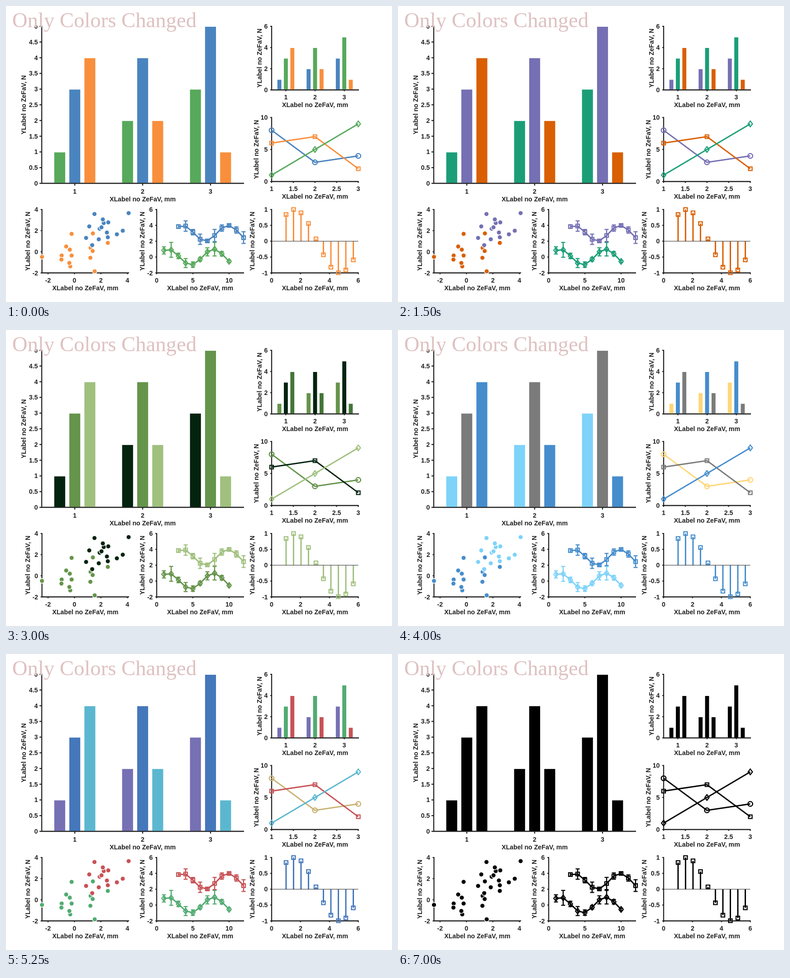
Write an HTML page with a canvas that moves like this. It is 853 px wide and 656 px high and loops after 7.38 s.

```html
<!DOCTYPE html>
<html lang="en">
<head>
<meta charset="utf-8">
<title>Only Colors Changed</title>
<style>
html, body { margin: 0; width: 100%; height: 100%; overflow: hidden; background: #fff; }
canvas { display: block; width: 853px; height: 656px; }
</style>
</head>
<body>
<canvas id="stage" width="853" height="656"></canvas>
<script>
const ctx = document.getElementById("stage").getContext("2d");
const LOOP = 7380;
const INK = "#212121";
const TAU = Math.PI * 2;
const NAME = "ZeFaV";
const COMMON = "10201202102012";

// Each scheme: start time, colours, and one colour index per series
// (wide bars, narrow bars, lines, scatter, error bars, stems).
const schemes = [
  [0, "#4a84bf #57a95b #f98f3c", COMMON],
  [250, "#0072bd #d95319 #edb120", COMMON],
  [1000, "#4270ae #b85d27 #eee364", "10212021002012"],
  [1500, "#7570b3 #1b9e77 #d95f02", COMMON],
  [2000, "#0000b3 #a2a2a6 #000000 #92c0f8", "10230132113103"],
  [2500, "#4292c6 #08306b #9ecae1", COMMON],
  [3000, "#03230f #65944b #a0c07e #437638", "01210310201212"],
  [3500, "#e6732e #7f2704 #fdae6b", COMMON],
  [4000, "#7dd3f9 #7b7b7b #468dcd #ffd678", "01232131202202"],
  [4500, "#4c72b0 #55a868 #c44e52", COMMON],
  [5250, "#7670b4 #4577bb #5bb7cf #52ab72 #c75256 #c9b274", "01203454243431"],
  [5750, "#4878cf #6acc65 #d65f5f", COMMON],
  [6250, "#0072b2 #009e73 #d55e00", COMMON],
  [6750, "#777777 #333333 #aaaaaa", COMMON],
  [7000, "#000000", "00000000000000"]
].map(([start, list, slots]) => {
  const colors = list.split(" ");
  return { start, colors: [...slots].map(i => colors[i]) };
});

// Plot boxes: pixel edges, data limits, ticks and label positions.
const wide = { l: 79, r: 525, t: 45, b: 393, x: [0.513, 3.487], y: [0, 5], xt: [1, 2, 3],
  yt: [0, 0.5, 1, 1.5, 2, 2.5, 3, 3.5, 4, 4.5, 5], yl: 39, gap: 18, tick: 5 };
const narrow = { l: 587, r: 779, t: 45, b: 186, x: [0.513, 3.487], y: [0, 6], xt: [1, 2, 3],
  yt: [0, 2, 4, 6], yl: 560, gap: 16, tick: 3 };
const lines = { l: 587, r: 778.5, t: 247, b: 389, x: [1, 3], y: [0, 10], xt: [1, 1.5, 2, 2.5, 3],
  yt: [0, 5, 10], yl: 552.5, gap: 16, tick: 3 };
const cloud = { l: 79.5, r: 271, t: 451, b: 591.5, x: [-2.46, 4.1], y: [-2, 4], xt: [-2, 0, 2, 4],
  yt: [-2, 0, 2, 4], yl: 48, gap: 16, tick: 3 };
const errors = { l: 333, r: 525, t: 451, b: 591.5, x: [0, 12], y: [-2, 6], xt: [0, 5, 10],
  yt: [-2, 0, 2, 4, 6], yl: 301, gap: 16, tick: 3 };
const stems = { l: 587, r: 778.5, t: 451, b: 591.5, x: [0, 6], y: [-1, 1], xt: [0, 2, 4, 6],
  yt: [-1, -0.5, 0, 0.5, 1], yl: 544, gap: 16, tick: 3 };

const heights = [[1, 2, 3], [3, 4, 5], [4, 2, 1]];
const trends = [[8, 3, 4], [6, 7, 2], [1, 5, 9]];
const upperDots = [[195.5, 461], [271, 459], [184, 488.5], [216, 481], [214, 473], [226, 479.5],
  [207, 493.5], [211, 490.5], [177, 514], [205, 517], [223, 502], [225, 512.5], [245, 506],
  [258, 498], [190.5, 530]];
const lowerDots = [[79.5, 556], [145, 505], [133, 533], [141, 540], [123, 553], [122.5, 562],
  [145, 553], [142, 577], [140, 569.5], [192, 504], [187, 536], [191.5, 543], [186.5, 558],
  [225, 525], [196, 588]];
const upperErr = [4, 11.5, 6, 11.5, 2.5, 13.5, 7, 2.5, 7, 13];
const lowerErr = [8, 16.5, 6, 10, 6, 4, 9, 15, 5, 2.5];

const px = (p, v) => p.l + (v - p.x[0]) / (p.x[1] - p.x[0]) * (p.r - p.l);
const py = (p, v) => p.b - (v - p.y[0]) / (p.y[1] - p.y[0]) * (p.b - p.t);

function path(points, color, width, closed) {
  ctx.beginPath();
  points.forEach(([x, y]) => ctx.lineTo(x, y));
  if (closed) ctx.closePath();
  ctx.strokeStyle = color;
  ctx.lineWidth = width;
  ctx.stroke();
}

function label(text, x, y, align = "center") {
  ctx.textAlign = align;
  ctx.fillText(text, x, y);
}

function axes(p) {
  const midX = (p.l + p.r) / 2, midY = (p.t + p.b) / 2;
  path([[p.l, p.t - 1], [p.l, p.b], [p.r + 1, p.b]], INK, 2.3);
  ctx.font = "bold 14.2px 'Liberation Sans', Arial, sans-serif";
  ctx.fillStyle = INK;
  for (const v of p.xt) {
    const x = px(p, v);
    path([[x, p.b], [x, p.b + p.tick]], INK, 2.2);
    label(v, x, p.b + p.gap + 5);
  }
  for (const v of p.yt) {
    const y = py(p, v);
    path([[p.l, y], [p.l - p.tick, y]], INK, 2.2);
    label(v, p.l - 8.5, y + 5, "right");
  }
  label(`XLabel no ${NAME}, mm`, midX, p.b + p.gap + 22);
  ctx.save();
  ctx.translate(p.yl + 5, midY);
  ctx.rotate(-Math.PI / 2);
  label(`YLabel no ${NAME}, N`, 0, 0);
  ctx.restore();
}

function marker(kind, x, y, color) {
  if (kind === "circle") {
    ctx.beginPath();
    ctx.arc(x, y, 5.2, 0, TAU);
    ctx.strokeStyle = color;
    ctx.lineWidth = 2.5;
    ctx.stroke();
  } else if (kind === "square") {
    path([[x - 4, y - 4], [x + 4, y - 4], [x + 4, y + 4], [x - 4, y + 4]], color, 2.3, true);
  } else {
    path([[x, y - 6.3], [x + 4.8, y], [x, y + 6.3], [x - 4.8, y]], color, 2.3, true);
  }
}

function bars(p, colors, step, width) {
  heights.forEach((set, s) => set.forEach((h, g) => {
    const x = px(p, g + 1) + (s - 1) * step;
    const top = py(p, h) + 1;
    ctx.fillStyle = colors[s];
    ctx.fillRect(x - width / 2, top, width, p.b - 1 - top);
  }));
}

function trendLines(colors) {
  const kinds = ["circle", "square", "diamond"];
  trends.forEach((set, s) => {
    const pts = set.map((v, i) => [px(lines, i + 1), py(lines, v)]);
    path(pts, colors[s], 3);
    pts.forEach(([x, y]) => marker(kinds[s], x, y, colors[s]));
  });
}

function dots(list, color) {
  for (const [x, y] of list) {
    ctx.beginPath();
    ctx.arc(x, y, 5.3, 0, TAU);
    ctx.fillStyle = color;
    ctx.fill();
    ctx.strokeStyle = "#fff";
    ctx.lineWidth = 1.5;
    ctx.stroke();
  }
}

function errorSeries(spread, first, lift, kind, color) {
  const pts = spread.map((_, i) => [px(errors, i + first), py(errors, Math.sin(i + 1) + lift)]);
  path(pts, color, 3);
  pts.forEach(([x, y], i) => {
    const e = spread[i];
    path([[x, y - e], [x, y + e]], color, 2.5);
    for (const end of [y - e, y + e]) path([[x - 4.5, end], [x + 4.5, end]], color, 2.3);
    marker(kind, x, y, color);
  });
}

function stemPlot(color) {
  const zero = py(stems, 0);
  for (let i = 0; i < 10; i++) {
    const v = 1 + i * (1.8 * Math.PI - 1) / 9;
    const x = px(stems, v), y = py(stems, Math.sin(v));
    path([[x, zero], [x, y]], color, 3);
    marker("square", x, y, color);
  }
  path([[stems.l, zero], [stems.r, zero]], INK, 1);
}

function heading() {
  ctx.fillStyle = "#fff";
  ctx.fillRect(0, 0, 430, 43.5);
  ctx.font = "46.7px 'Liberation Serif', 'Times New Roman', serif";
  ctx.fillStyle = "#dfc1c1";
  label("Only Colors Changed", 13.8, 46.8, "left");
}

function draw(c) {
  ctx.fillStyle = "#fff";
  ctx.fillRect(0, 0, 853, 656);
  [wide, narrow, lines, cloud, errors, stems].forEach(axes);
  bars(wide, c.slice(0, 3), 33.3, 24.2);
  bars(narrow, c.slice(3, 6), 14.3, 8.8);
  trendLines(c.slice(6, 9));
  dots(lowerDots, c[10]);
  dots(upperDots, c[9]);
  errorSeries(lowerErr, 1, 0, "diamond", c[12]);
  errorSeries(upperErr, 3, 3, "square", c[11]);
  stemPlot(c[13]);
  heading();
}

const began = performance.now();
function tick() {
  const t = (performance.now() - began) % LOOP;
  draw(schemes.filter(s => s.start <= t).pop().colors);
  requestAnimationFrame(tick);
}
tick();
</script>
</body>
</html>
```
